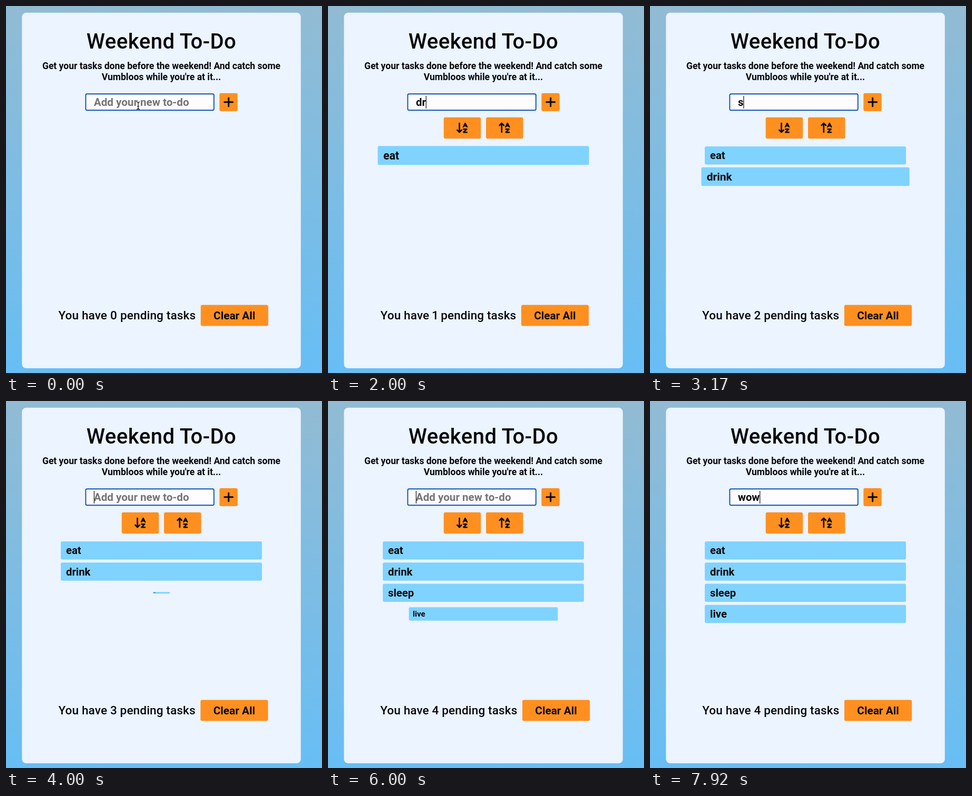
An HTML page for the animation above (8 s loop, 600 by 698 pixels).

```html
<!DOCTYPE html>
<html lang="en">
<head>
<meta charset="utf-8">
<title>Weekend To-Do</title>
<style>
  html, body { margin: 0; width: 100%; height: 100%; overflow: hidden; }
  svg { display: block; width: 100%; height: 100%; }
  text { font: 600 20.3px Roboto, Inter, sans-serif; fill: #070709; white-space: pre; }
  .mid { text-anchor: middle; }
  .title { font-size: 40px; font-weight: 500; letter-spacing: .5px; }
  .sub { font-size: 17.5px; }
  .count { font-size: 22.5px; font-weight: 500; letter-spacing: .15px; font-variant-numeric: proportional-nums; text-anchor: end; }
  .hint { font-size: 20.6px; fill: #757575; }
  .clear { font-size: 20.8px; }
  .btn { fill: #ff9020; }
  .item { fill: #80d3ff; }
  .ink { fill: none; stroke: #070709; stroke-linecap: round; stroke-linejoin: round; }
</style>
</head>
<body>
<svg viewBox="0 0 600 698">
  <defs>
    <linearGradient id="sky" x2="0" y2="1">
      <stop offset="0" stop-color="#92bbd3"/>
      <stop offset="1" stop-color="#67bef5"/>
    </linearGradient>
    <path id="letters" class="ink" stroke-width="2.5"
      d="M257 230L260.5 223L264 230M258.5 228H262.5M257.3 234.2H263.4L257.3 240.2H263.8"/>
  </defs>
  <rect width="600" height="698" fill="url(#sky)"/>
  <rect x="30.3" y="12.8" width="529.5" height="676.2" rx="8" fill="#ebf4ff"/>

  <text class="mid title" x="295" y="81">Weekend To-Do</text>
  <text class="mid sub" x="295" y="120">Get your tasks done before the weekend! And catch some</text>
  <text class="mid sub" x="295" y="141.3">Vumbloos while you're at it...</text>

  <rect x="151.4" y="167.2" width="243.4" height="31.1" rx="2.5" fill="#fffcff" stroke="#0b52b4" stroke-width="1.9"/>
  <text id="hint" class="hint" x="166.8" y="190">Add your new to-do</text>
  <text id="typed" x="167" y="190"></text>
  <rect id="caret" y="171" width="1.2" height="24" fill="#111"/>
  <path id="pointer" class="ink" stroke-width="1.2" d="M248.3 182.5Q251 182.5 251 185V194Q251 196.5 248.3 196.5M253.7 182.5Q251 182.5 251 185M251 194Q251 196.5 253.7 196.5M249.5 191H252.5"/>

  <rect class="btn" x="405.3" y="165.7" width="34.4" height="34.2" rx="3"/>
  <path class="ink" stroke-width="3" d="M414.8 182.8H430.6M422.7 174.9V190.7"/>

  <g id="sort">
    <rect class="btn" x="219.7" y="211.8" width="70.5" height="40.4" rx="3"/>
    <rect class="btn" x="300" y="211.8" width="70.5" height="40.4" rx="3"/>
    <path class="ink" stroke-width="2.6" d="M249.5 223V240M245.4 236L249.5 240.2L253.6 236"/>
    <path class="ink" stroke-width="2.6" d="M329.8 240V223M325.7 227L329.8 222.8L333.9 227"/>
    <use href="#letters"/>
    <use href="#letters" x="80.3"/>
  </g>

  <g id="list"></g>

  <text id="count" class="count" y="595.5"></text>
  <g id="clear">
    <rect class="btn" y="568.4" width="128.2" height="40.2" rx="3"/>
    <text class="mid clear" x="64" y="595.5">Clear All</text>
  </g>
</svg>
<script>
const LOOP = 8000;
const $ = id => document.getElementById(id);

// Each task: the time of every key press, then of Enter.
const tasks = [
  { word: 'eat', keys: [75, 330, 600], enter: 1530 },
  { word: 'drink', keys: [1830, 1960, 2130, 2290, 2430], enter: 2889 },
  { word: 'sleep', keys: [3100, 3280, 3450, 3600, 3760], enter: 3960 },
  { word: 'live', keys: [4400, 4540, 4740, 4920], enter: 5826 },
  { word: 'wow', keys: [7000, 7350, 7620], enter: Infinity }
];
const clearX = [369.7, 366.9, 368.9, 369.3, 369];

const make = (name, attrs, parent) => {
  const el = document.createElementNS('http://www.w3.org/2000/svg', name);
  for (const key in attrs) el.setAttribute(key, attrs[key]);
  return parent.appendChild(el);
};
const show = (el, on) => el.setAttribute('visibility', on ? 'visible' : 'hidden');

const rows = tasks.slice(0, 4).map(({ word }) => {
  const row = make('g', {}, $('list'));
  make('rect', { class: 'item', x: -191, y: -17.2, width: 382, height: 34.4, rx: 3 }, row);
  make('text', { x: -181, y: 7 }, row).textContent = word;
  return row;
});

// Underdamped spring from 0 to 1 that rests after its overshoot.
function spring(ms) {
  const s = ms / 1000;
  if (s <= 0) return 0;
  if (s > 0.626) return 1;
  const a = 8.6 * s;
  return 1 - Math.exp(-6.8 * s) * (Math.cos(a) + 0.79 * Math.sin(a));
}

function draw(t) {
  const done = tasks.filter(task => t >= task.enter).length;
  const { word, keys } = tasks[done];
  const text = word.slice(0, keys.filter(k => t >= k).length);
  const lastKey = Math.max(...tasks.flatMap(task => task.keys).filter(k => t >= k));

  $('typed').textContent = text;
  show($('hint'), !text);
  show($('pointer'), t < tasks[0].keys[0]);
  show($('caret'), (t - lastKey) % 1000 < 500);
  $('caret').setAttribute('x', 166.8 + (text ? $('typed').getComputedTextLength() : 0));

  show($('sort'), done > 0);
  rows.forEach((row, i) => {
    const scale = spring(t - tasks[i].enter);
    show(row, scale > 0);
    row.setAttribute('transform', `translate(295 ${284.3 + i * 40.25}) scale(${scale})`);
  });

  const x = clearX[done];
  $('count').textContent = `You have ${done} pending tasks`;
  $('count').setAttribute('x', x - 9.5);
  $('clear').setAttribute('transform', `translate(${x} 0)`);
}

const start = performance.now();
function tick() {
  draw((performance.now() - start) % LOOP);
  requestAnimationFrame(tick);
}
tick();
</script>
</body>
</html>
```
